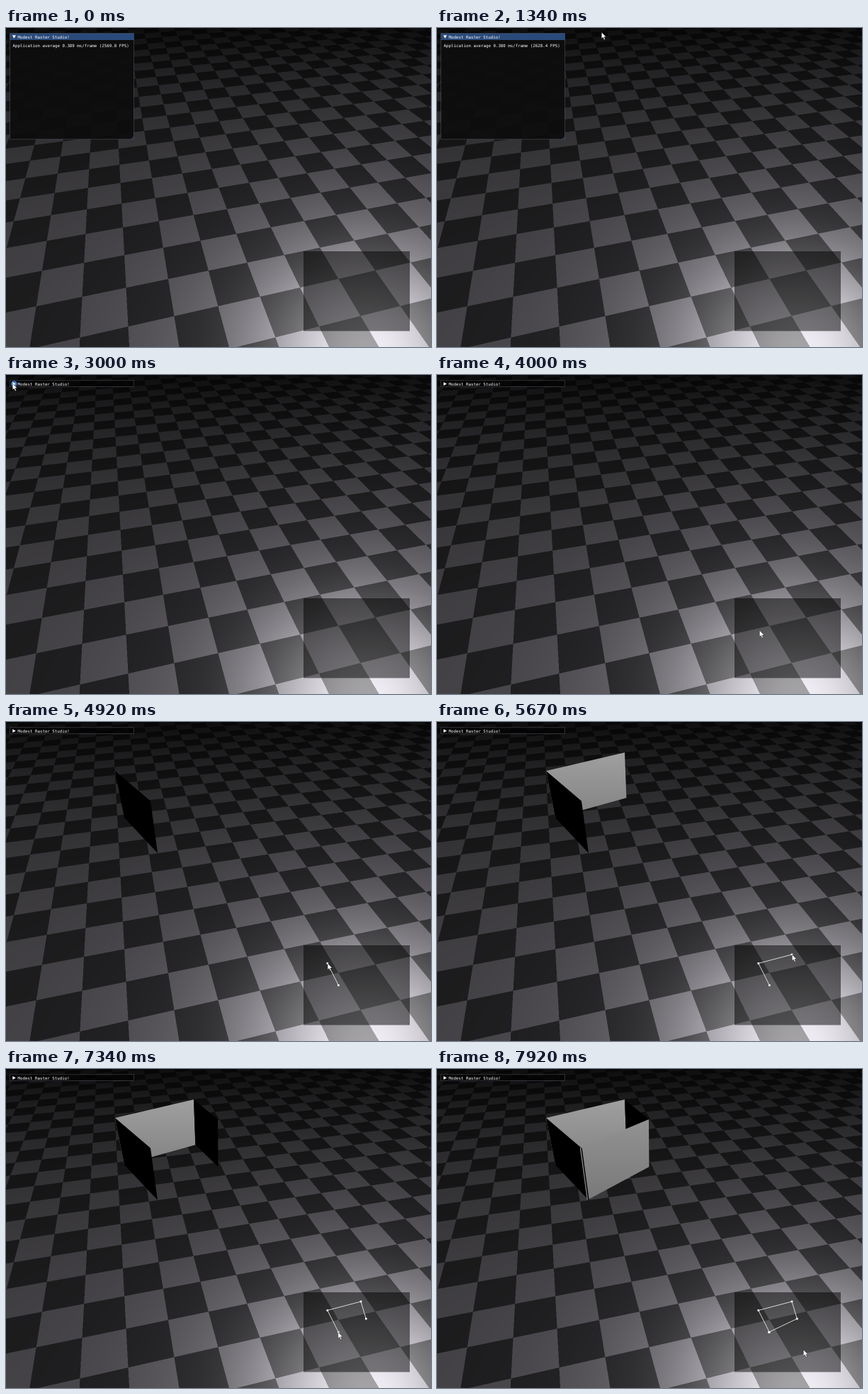
Write an HTML page with a canvas that moves like this. It is 600 px wide and 450 px high and loops after 8000 ms.

```html
<!DOCTYPE html>
<html lang="en">
<head>
<meta charset="utf-8">
<title>Wall drawing demo</title>
<style>
html, body { margin: 0; width: 100%; height: 100%; overflow: hidden; background: #000; }
canvas { display: block; width: 600px; height: 450px; }
</style>
</head>
<body>
<canvas id="stage" width="600" height="450"></canvas>
<script>
const W = 600, H = 450, LOOP = 8000, TICK = 250 / 3;
const COLLAPSE = 34;
const ctx = document.getElementById('stage').getContext('2d');

// Perspective floor: screen = (a u + b v + c, d u + e v + f) / (g u + h v + 1)
const P = { a: 74.14, b: 14.1, c: 32.9, d: -5.25, e: -20.4, f: 452.8, g: 0.0251, h: 0.1014 };

function isDark(x, y) {
  const m = P.a - x * P.g, n = P.b - x * P.h, p = x - P.c;
  const q = P.d - y * P.g, r = P.e - y * P.h, s = y - P.f;
  const det = m * r - n * q;
  const u = (p * r - n * s) / det, v = (m * s - p * q) / det;
  return ((Math.floor(u) + Math.floor(v)) & 1) === 0;
}

const bell = (d, r) => Math.exp(-(d * d) / (r * r));

function makeFloor() {
  const cv = document.createElement('canvas');
  cv.width = W;
  cv.height = H;
  const c = cv.getContext('2d'), img = c.createImageData(W, H);
  for (let y = 0; y < H; y++) {
    for (let x = 0; x < W; x++) {
      let dark = 0;
      for (let k = 0; k < 4; k++) {
        if (isDark(x + 0.25 + 0.5 * (k & 1), y + 0.25 + 0.5 * (k >> 1))) dark++;
      }
      const dist = Math.hypot(x - 510, (y - 450) * 1.15);
      const light = 14 + 54 * (1 - Math.exp(-y / 150)) + 70 * bell(dist, 270);
      const diffuse = light * (1 - 0.57 * dark / 4);
      const shine = 105 * bell(dist, 140);
      const i = (y * W + x) * 4;
      img.data[i] = diffuse + shine;
      img.data[i + 1] = diffuse * 0.975 + shine;
      img.data[i + 2] = diffuse * 1.03 + shine;
      img.data[i + 3] = 255;
    }
  }
  c.putImageData(img, 0, 0);
  return cv;
}
const floor = makeFloor();

// Points of the plan and the tick at which each is placed
const DOTS = [
  { x: 469.3, y: 371.3, at: 52 },
  { x: 453.8, y: 340.5, at: 59 },
  { x: 501, y: 328, at: 68 },
  { x: 508.3, y: 352.3, at: 74 },
  { x: 468.5, y: 371.2, at: 92 }
];

// Corner posts: top and bottom
const POSTS = [
  [[204, 111.5], [214, 185]],
  [[154, 69], [167, 135]],
  [[265, 43], [267.4, 107]],
  [[299, 71], [299.5, 138]]
];

// Cursor moves: first tick, last tick, destination
const ENTRY = { at: 16, x: 232, y: 6 };
const MOVES = [
  [16, 19, { x: 519, y: 88 }],
  [20, 27, { x: 37, y: 25 }],
  [28, 31, { x: 9, y: 12 }],
  [36, 38, { x: 54, y: 52 }],
  [40, 49, DOTS[0]],
  [54, 56, DOTS[1]],
  [60, 66, DOTS[2]],
  [68, 72, DOTS[3]],
  [76, 77, { x: 508, y: 360 }],
  [77, 86, DOTS[4]],
  [93, 95, { x: 517, y: 396 }]
];

const ease = s => s * s * (3 - 2 * s);
const mix = (p, q, s) => p + (q - p) * s;

function cursorAt(k) {
  let { x, y } = ENTRY;
  for (const [from, to, goal] of MOVES) {
    if (k <= from) break;
    const s = ease(Math.min(1, (k - from) / (to - from)));
    x = mix(x, goal.x, s);
    y = mix(y, goal.y, s);
  }
  return { x, y };
}

function poly(pts, fill) {
  ctx.beginPath();
  pts.forEach(([x, y]) => ctx.lineTo(x, y));
  ctx.closePath();
  ctx.fillStyle = fill;
  ctx.fill();
}

function line(x1, y1, x2, y2, color, width) {
  ctx.strokeStyle = color;
  ctx.lineWidth = width;
  ctx.beginPath();
  ctx.moveTo(x1, y1);
  ctx.lineTo(x2, y2);
  ctx.stroke();
}

function rect(x, y, w, h, color) {
  ctx.fillStyle = color;
  ctx.fillRect(x, y, w, h);
}

function shade(y1, y2, from, to) {
  const g = ctx.createLinearGradient(0, y1, 0, y2);
  g.addColorStop(0, from);
  g.addColorStop(1, to);
  return g;
}

function label(text, x, y) {
  ctx.font = '5.81px "DejaVu Sans Mono", "Liberation Mono", monospace';
  ctx.fillStyle = '#fff';
  ctx.fillText(text, x, y);
}

function wall(p, q, fill) {
  poly([p[0], q[0], q[1], p[1]], fill);
}

function drawWalls(k) {
  const [a, b, c, d] = POSTS;
  if (k >= DOTS[2].at) wall(b, c, shade(43, 130, '#a09fa0', '#858485'));
  if (k >= DOTS[3].at) wall(c, d, '#000');
  if (k >= DOTS[1].at) wall(a, b, '#000');
  if (k >= DOTS[4].at) {
    const end = a.map(([x, y]) => [x - 2.2, y]);
    wall(d, end, shade(75, 175, '#929192', '#7c7b7c'));
    line(...a[0], ...a[1], '#000', 1.5);
  }
}

function drawPlan(k) {
  rect(420, 315, 150, 112.5, 'rgba(0,0,0,0.5)');
  DOTS.forEach(({ x, y, at }, i) => {
    if (k < at) return;
    if (i) line(DOTS[i - 1].x, DOTS[i - 1].y, x, y, '#e8e8e8', 0.9);
    rect(x - 1.3, y - 1.3, 2.6, 2.6, '#fff');
  });
}

function drawWindow(k) {
  const open = k < COLLAPSE;
  const h = open ? 149.5 : 9;
  rect(5.5, 7.5, 175, h, open ? 'rgba(13,13,13,0.94)' : 'rgba(0,0,0,0.65)');
  if (open) {
    rect(5.5, 7.5, 175, 9.5, '#294a7a');
    poly([[180.5, 152], [180.5, 157], [175.5, 157]], 'rgba(66,110,190,0.3)');
  }
  ctx.strokeStyle = 'rgba(110,110,128,0.5)';
  ctx.lineWidth = 0.8;
  ctx.strokeRect(5.5, 7.8, 175, h - 0.4);

  if (k >= 31 && k < 38) {
    ctx.fillStyle = '#4277bd';
    ctx.beginPath();
    ctx.arc(11.3, 12.5, 4.3, 0, 7);
    ctx.fill();
  }
  poly(open ? [[8.9, 10.3], [14, 10.3], [11.45, 14.8]] : [[9.3, 10], [13.8, 12.5], [9.3, 15]], '#fff');
  label('Modest Raster Studio!', 16.5, 14.7);

  if (open) {
    // A rolling average that settles
    const fps = 2569.8 + 64.9 * (1 - Math.exp(-k / 6.86));
    label(`Application average ${(1000 / fps).toFixed(3)} ms/frame (${fps.toFixed(1)} FPS)`, 9.6, 26.5);
  }
}

function drawCursor(k) {
  if (k < ENTRY.at) return;
  const { x, y } = cursorAt(k);
  ctx.save();
  ctx.translate(x + 0.3, y);
  poly([[0, 0], [0, 9], [2, 7.1], [3.6, 10.6], [5.1, 10], [3.6, 6.6], [6.4, 6.5]], '#fff');
  ctx.strokeStyle = 'rgba(0,0,0,0.75)';
  ctx.lineWidth = 0.5;
  ctx.stroke();
  ctx.restore();
}

function frame() {
  const k = Math.floor((performance.now() % LOOP) / TICK);
  ctx.drawImage(floor, 0, 0);
  drawWalls(k);
  drawPlan(k);
  drawWindow(k);
  drawCursor(k);
  requestAnimationFrame(frame);
}
frame();
</script>
</body>
</html>
```
